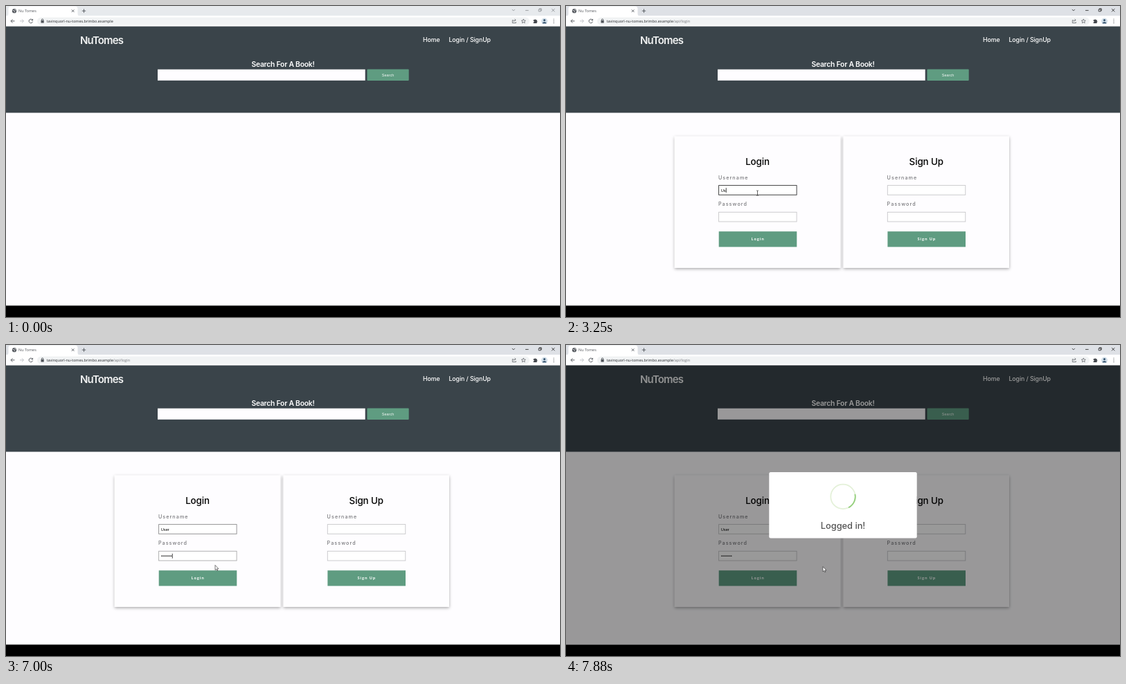
An HTML page that plays this animation: 800x450 px, repeating every 8 s.

```html
<!DOCTYPE html>
<html lang="en">
<head>
<meta charset="utf-8">
<title>Nu Tomes</title>
<style>
  html, body { margin: 0; width: 100%; height: 100%; overflow: hidden; background: #000; }
  svg { display: block; width: 100vw; height: 100vh; }
  text { font-family: Inter, sans-serif; white-space: pre; }
  .ui { font-family: "Open Sans", sans-serif; font-size: 5.5px; }
  .field { font-family: "Liberation Sans", Arial, sans-serif; font-size: 5.7px; }
  .mid { text-anchor: middle; }
  .nav { font-size: 8.8px; letter-spacing: -.1px; fill: #fff; font-weight: 500; }
  .label { font-size: 7.2px; letter-spacing: 1.05px; fill: #77777b; font-weight: 500; }
  .title { font-size: 13.4px; letter-spacing: -.1px; font-weight: 500; fill: #000; }
  .button { font: 700 5.5px "Open Sans", sans-serif; letter-spacing: .9px; }
  .icon { fill: none; stroke: #50545a; stroke-width: .9; }
</style>
</head>
<body>
<svg viewBox="0 0 800 450" preserveAspectRatio="none">
  <defs>
    <filter id="shadow" x="-10%" y="-10%" width="120%" height="125%">
      <feDropShadow dx="0" dy="1.5" stdDeviation="2.2" flood-opacity=".34"/>
    </filter>
  </defs>

  <!-- Browser window -->
  <rect id="tabBar" width="800" height="15"/>
  <path d="M0 14.5Q3.5 14.5 3.5 11V4Q3.5 .5 7 .5H100Q103.5 .5 103.5 4V11Q103.5 14.5 107 14.5Z" fill="#fff"/>
  <rect y="14" width="800" height="16" fill="#fff"/>
  <circle cx="12" cy="7.2" r="3.1" fill="#50545a"/>
  <path d="M9.7 6.2l2 .8 1 1.4-1 1M12.3 4.8l.6 1 1.6.2" stroke="#fff" stroke-width=".8" fill="none"/>
  <text class="ui" x="18" y="9.2" fill="#55585d">Nu Tomes</text>
  <g class="icon">
    <path d="M94.8 5.3l3.6 3.6m0-3.6l-3.6 3.6M109.8 7.1h5.4m-2.7-2.7v5.4"/>
    <path d="M12.5 21.8H7m2.6-2.6L7 21.8l2.6 2.6"/>
    <path d="M20 21.8h5.5m-2.6-2.6l2.6 2.6-2.6 2.6" stroke="#bcbfc3"/>
    <path d="M38.2 20.2A2.8 2.8 0 1 0 38.6 22.6M38.6 18.8v2h-2"/>
  </g>
  <rect x="45" y="16.4" width="711" height="11" rx="5.5" fill="#f1f3f4"/>
  <path d="M50.5 20.9h4.2v3.6h-4.2z" fill="#50545a"/>
  <path class="icon" d="M51.4 21v-1a1.2 1.2 0 0 1 2.4 0v1" stroke-width=".7"/>
  <text class="ui" x="58.5" y="23.9" fill="#25282c">tavinquorl-nu-tomes.brimbo.example<tspan id="path" fill="#74777c">/api/login</tspan></text>
  <g class="icon" style="stroke-width:.7">
    <path d="M732.8 20.5h-1.5v4h5v-1.5M732.8 22.8q.3-2.4 3-2.4m-1.2-1.5l1.6 1.5-1.6 1.5"/>
    <path d="M747.3 18.9l.9 2 2.1.2-1.6 1.4.5 2.1-1.9-1.1-1.9 1.1.5-2.1-1.6-1.4 2.1-.2z"/>
  </g>
  <path d="M761.6 20h1.4a1.1 1.1 0 0 1 2.1 0h1.5v1.5a1.1 1.1 0 0 1 0 2.1v1.4h-5v-1.5a1 1 0 0 0 0-2z" fill="#44484d"/>
  <circle cx="777.5" cy="21.8" r="4.4" fill="#cfdde8"/>
  <path d="M774.6 24.6q2.9-3 5.8 0v.7h-5.8z" fill="#34516b"/>
  <circle cx="777.5" cy="20.6" r="1.5" fill="#34516b"/>
  <path d="M791 19v.1m0 2.6v.1m0 2.6v.1" stroke="#50545a" stroke-width="1.2" stroke-linecap="round"/>
  <path id="controls" fill="none" stroke-width=".8" d="M730.8 4.9l2 2 2-2M750 6.4h4.6M769.2 4.8h3v3h-3zM770.2 4.8v-1h3v3h-1M788 3.9l4.4 4.4m0-4.4L788 8.3"/>

  <!-- Page -->
  <rect y="29.5" width="800" height="404" fill="#fefdff"/>
  <rect y="29.5" width="800" height="125" fill="#3a444a"/>
  <text x="107" y="54.6" fill="#f0f1f1" font-size="15" font-weight="600" letter-spacing="-.9">NuTomes</text>
  <text class="nav" x="602" y="51.5">Home</text>
  <text class="nav" x="639.5" y="51.5">Login / SignUp</text>
  <text class="mid" x="400" y="87.8" fill="#fff" font-size="10.3" font-weight="600" letter-spacing="-.2">Search For A Book!</text>
  <rect x="219" y="91.7" width="299.7" height="16.1" fill="#fefdff"/>
  <rect x="521.5" y="91.5" width="60.2" height="16.5" rx="1" fill="#5f9c81"/>
  <text class="field mid" x="551.5" y="101.5" fill="#f2f7f4" style="font-size:5.5px">Search</text>
  <g id="forms"></g>

  <!-- Dialog -->
  <g id="dialog">
    <rect id="veil" y="29.5" width="800" height="404"/>
    <g id="popup">
      <rect x="293.3" y="184" width="213.4" height="95.5" rx="2.2" fill="#fff"/>
      <circle cx="400" cy="219.4" r="17.7" fill="none" stroke="#e4f1d9" stroke-width="1.8"/>
      <path id="arc" d="M417.4 215.9A17.7 17.7 0 0 1 408 235.2" fill="none" stroke="#94cf7c" stroke-width="1.8"/>
      <text class="mid" x="400" y="265.7" font-size="12.8" font-weight="500" fill="#545454">Logged in!</text>
    </g>
  </g>
  <g id="cursor"><path id="shape"/></g>
</svg>

<script>
const LOOP = 8000;
const el = id => document.getElementById(id);
const show = (id, on) => el(id).setAttribute('visibility', on ? 'inherit' : 'hidden');

const field = (x, y, id) =>
  `<rect id="${id}" x="${x + .5}" y="${y}" width="112.5" height="13.7" fill="#fff" stroke="#c6c6c9" stroke-width=".9"/>`;

function card(x, name, id) {
  const left = x + 63.5, mid = x + 119.7;
  return `<rect x="${x}" y="188.7" width="239.4" height="190.3" fill="#fefdff" filter="url(#shadow)"/>
    <text class="title mid" x="${mid}" y="229.9">${name}</text>
    <text class="label" x="${left - .5}" y="250.9">Username</text>
    <text class="label" x="${left - .5}" y="289.3">Password</text>
    ${field(left - .3, 259.6, id + 'User')}${field(left - .3, 298.3, id + 'Pass')}
    <rect x="${left + .3}" y="326.2" width="112.6" height="22.4" fill="#5f9c81"/>
    <text class="button mid" x="${mid + .5}" y="339.4" fill="#f4f8f6">${name}</text>
    <g id="${id}Hover" opacity="0">
      <rect x="${left + .5}" y="326.4" width="112.2" height="22" fill="#fefdff" stroke="#5f9c81" stroke-width=".9"/>
      <text class="button mid" x="${mid + .5}" y="339.4" fill="#5f9c81">${name}</text>
    </g>`;
}
el('forms').innerHTML = card(156.9, 'Login', 'in') + card(400.6, 'Sign Up', 'up') +
  `<text id="user" class="field" x="223.7" y="268.6"></text>
   <text id="pass" class="field" x="223.7" y="307.2"></text>
   <path id="caret" stroke="#111" stroke-width=".8"/>`;

const shapes = {
  arrow: ['M0 0V7.2L1.7 5.7 2.8 8.2 3.9 7.7 2.8 5.3H5Z', '#fff', '#222', .6],
  beam: ['M-1.4 -3.6H-.4L0 -3.2 .4 -3.6H1.4M0 -3.2V3.2M-1.4 3.6H-.4L0 3.2 .4 3.6H1.4', 'none', '#222', .7],
  hand: ['M0 0Q1 -.6 1.3 .4V3L4.6 3.8 4.9 5.5 4.1 8.2H.6L-1.8 4.8 -1 4.1 0 5Z', '#fff', '#222', .6]
};

// Each row starts at its time and holds until the next one.
const steps = {
  cursor: [[0], [1130, 'hand', 668, 48], [1630, 'arrow', 655, 82], [1750, 'arrow', 612, 150],
    [1880, 'arrow', 539, 220], [2000, 'arrow', 420, 246], [2130, 'beam', 312, 266],
    [2250, 'beam', 276.5, 270.7], [6750, 'beam', 279, 277], [6880, 'beam', 292, 303],
    [7000, 'arrow', 302, 318.5], [7130, 'arrow', 297, 331], [7250, 'arrow', 290, 338],
    [7380, 'arrow', 285.5, 340], [7630, 'arrow', 303.5, 335], [7750, 'arrow', 337, 328],
    [7880, 'arrow', 371, 320.7]],
  user: [[0, 0], [3130, 1], [3250, 2], [3500, 3], [3750, 4]],
  pass: [[0, 0], [4630, 1], [4750, 2], [4880, 3], [5130, 4], [5380, 5], [5500, 6], [5880, 7], [6380, 8]],
  caret: [[0, ''], [2380, 'user'], [2880, ''], [3130, 'user'], [4130, 'pass'], [7130, '']],
  userEdge: [[0, 0], [2130, .5], [2250, 1], [6750, .8], [6880, .6], [7000, .4], [7130, .15], [7250, 0]],
  passEdge: [[0, 0], [6880, .3], [7000, .2], [7130, 0]],
  hover: [[0, 0], [7130, .4], [7250, .8], [7380, 1], [7630, .8], [7750, .35], [7880, 0]],
  dialog: [[0, 0, 1], [7630, .36, .946], [7750, .4, .965], [7880, .4, 1]]
};
const at = (name, t) => steps[name].findLast(row => row[0] <= t).slice(1);

function edge(id, amount) {
  const v = Math.round(198 - 150 * amount);
  el(id).setAttribute('stroke', `rgb(${v},${v},${v + 2})`);
}

function drawCursor([type, x, y]) {
  show('cursor', !!type);
  if (!type) return;
  const [d, fill, stroke, width] = shapes[type];
  el('cursor').setAttribute('transform', `translate(${x} ${y})`);
  Object.entries({ d, fill, stroke, 'stroke-width': width })
    .forEach(([key, value]) => el('shape').setAttribute(key, value));
}

function draw(t) {
  const focused = t >= 1250, loginPage = t >= 1500;
  el('tabBar').setAttribute('fill', focused ? '#dee1e6' : '#e7eaed');
  el('controls').setAttribute('stroke', focused ? '#222' : '#8b8e92');
  show('path', loginPage);
  show('forms', loginPage);

  const counts = { user: at('user', t)[0], pass: at('pass', t)[0] };
  el('user').textContent = 'User'.slice(0, counts.user);
  el('pass').textContent = '•'.repeat(counts.pass);
  edge('inUser', at('userEdge', t)[0]);
  edge('inPass', at('passEdge', t)[0]);
  el('inHover').setAttribute('opacity', at('hover', t)[0]);

  const [target] = at('caret', t);
  show('caret', loginPage && target);
  if (target) {
    const x = 224.3 + (counts[target] && el(target).getComputedTextLength());
    el('caret').setAttribute('d', `M${x} ${target === 'user' ? 263.2 : 301.9}v6.8`);
  }

  const [veil, scale] = at('dialog', t);
  show('dialog', veil > 0);
  el('veil').setAttribute('opacity', veil);
  el('popup').setAttribute('transform', `translate(400 231.8) scale(${scale}) translate(-400 -231.8)`);
  show('arc', t >= 7880);
  drawCursor(at('cursor', t));
}

const start = performance.now();
function tick() {
  draw((performance.now() - start) % LOOP);
  requestAnimationFrame(tick);
}
tick();
</script>
</body>
</html>
```
